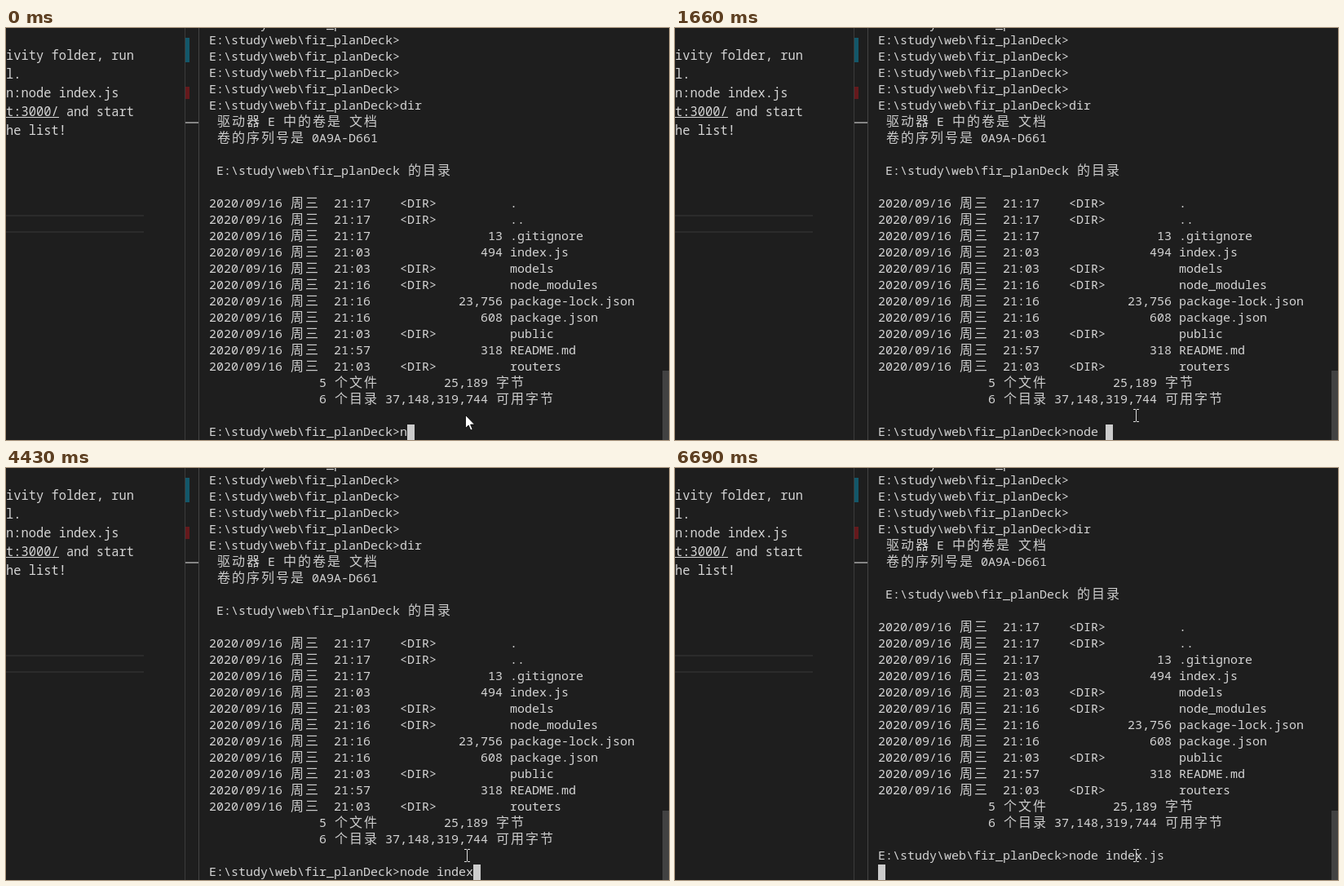
An HTML page for the animation above (8 s loop, 813 by 505 pixels).

```html
<!DOCTYPE html>
<html lang="en">
<head>
<meta charset="utf-8">
<title>Terminal session</title>
<style>
  html, body { margin: 0; width: 100%; height: 100%; overflow: hidden; background: #1e1e1e; }
  svg { display: block; width: 813px; height: 505px; }
  text { font: 15px "Noto Sans Mono", "DejaVu Sans Mono", monospace; fill: #d4d4d4; white-space: pre; }
  text.han { font: 300 16px "Noto Sans CJK SC", "Noto Sans CJK", sans-serif; fill: #ccc; }
  #notes text { font-size: 15.4px; }
</style>
</head>
<body>
<svg id="stage" viewBox="0 0 813 505">
  <rect width="813" height="505" fill="#1e1e1e"/>
  <g id="notes"></g>
  <rect y="109" width="65" height="1" fill="#d4d4d4"/>
  <g fill="#2b2b2b">
    <rect y="229" width="169" height="2"/>
    <rect y="249" width="169" height="2"/>
  </g>
  <rect x="219" width="1" height="505" fill="#3b3b3b"/>
  <rect x="220" y="12" width="5" height="30" fill="#13576a"/>
  <rect x="220" y="72" width="5" height="15" fill="#65191c"/>
  <rect x="220" y="115" width="16" height="2" fill="#868686"/>
  <rect x="236" width="1" height="505" fill="#444"/>
  <rect x="805" y="420" width="8" height="85" fill="#424242"/>
  <g id="screen"></g>
  <rect id="caret" width="9" height="20" fill="#ccc"/>
  <path id="arrow" d="M563.5 474.5v16l3.7-3.5 2.6 6 2.4-1-2.6-5.9h5z" fill="#fff" stroke="#000" stroke-width=".8"/>
  <path id="beam" d="M562 467.5h3M566 467.5h3M565.5 468v14M562 482.5h3M566 482.5h3" fill="none" stroke="#dcdcdc"/>
</svg>
<script>
const LOOP = 8000, CELL = 9, ROW = 20, LEFT = 249, LAST_ROW = 486;
const PROMPT = "E:\\study\\web\\fir_planDeck>";
const COMMAND = "node index.js";

// [time in ms, characters typed]
const typing = [
  [0, 1], [1110, 2], [1260, 3], [1380, 4], [1660, 5], [3870, 6],
  [4000, 8], [4150, 9], [4430, 10], [5170, 11], [5850, 13]
];
const POINTER_CHANGE = 150, ENTER = 6690;

const $ = id => document.getElementById(id);

function addText(parent, x, y, content, className = "") {
  const node = document.createElementNS("http://www.w3.org/2000/svg", "text");
  node.setAttribute("x", x);
  node.setAttribute("y", y);
  node.setAttribute("class", className);
  node.textContent = content;
  parent.append(node);
  return node;
}

// Places each word on the character grid; Han characters take two cells.
function addLine(line, top) {
  let wide = 0;
  for (const match of line.matchAll(/[\u4e00-\u9fff]|[^\s\u4e00-\u9fff]+/g)) {
    const han = match[0] >= "\u4e00";
    const x = LEFT + (match.index + wide) * CELL;
    addText($("screen"), x + (han ? 1 : 0), top + 14, match[0], han ? "han" : "");
    if (han) wide++;
  }
}

const entry = (time, size, name) =>
  `2020/09/16 周三  ${time}    ` +
  (size ? size.padStart(14) : "<DIR>".padEnd(14)) + " " + name;

const lines = [
  ...Array(6).fill(PROMPT),
  PROMPT + "dir",
  " 驱动器 E 中的卷是 文档",
  " 卷的序列号是 0A9A-D661",
  "",
  ` ${PROMPT.slice(0, -1)} 的目录`,
  "",
  entry("21:17", "", "."),
  entry("21:17", "", ".."),
  entry("21:17", "13", ".gitignore"),
  entry("21:03", "494", "index.js"),
  entry("21:03", "", "models"),
  entry("21:16", "", "node_modules"),
  entry("21:16", "23,756", "package-lock.json"),
  entry("21:16", "608", "package.json"),
  entry("21:03", "", "public"),
  entry("21:57", "318", "README.md"),
  entry("21:03", "", "routers"),
  " ".repeat(15) + "5 个文件" + "25,189".padStart(15) + " 字节",
  " ".repeat(15) + "6 个目录 37,148,319,744 可用字节",
  "",
  PROMPT
];
lines.forEach((line, i) => addLine(line, LAST_ROW - (lines.length - 1 - i) * ROW));

const inputX = LEFT + PROMPT.length * CELL;
const input = addText($("screen"), inputX, LAST_ROW + 14, "");

["ivity folder, run", "l.", "n:node index.js", "t:3000/ and start", "he list!"]
  .forEach((line, i) => addText($("notes"), 0, 39 + i * 23, line));

function render(t) {
  const typed = typing.findLast(([start]) => start <= t)[1];
  const entered = t >= ENTER;
  input.textContent = COMMAND.slice(0, typed);
  $("screen").setAttribute("transform", `translate(0 ${entered ? -ROW : 0})`);
  $("caret").setAttribute("x", entered ? LEFT : inputX + typed * CELL);
  $("caret").setAttribute("y", LAST_ROW);
  $("arrow").style.display = t < POINTER_CHANGE ? "" : "none";
  $("beam").style.display = t < POINTER_CHANGE ? "none" : "";
}

const started = performance.now();
function tick() {
  render((performance.now() - started) % LOOP);
  requestAnimationFrame(tick);
}
tick();
</script>
</body>
</html>
```
